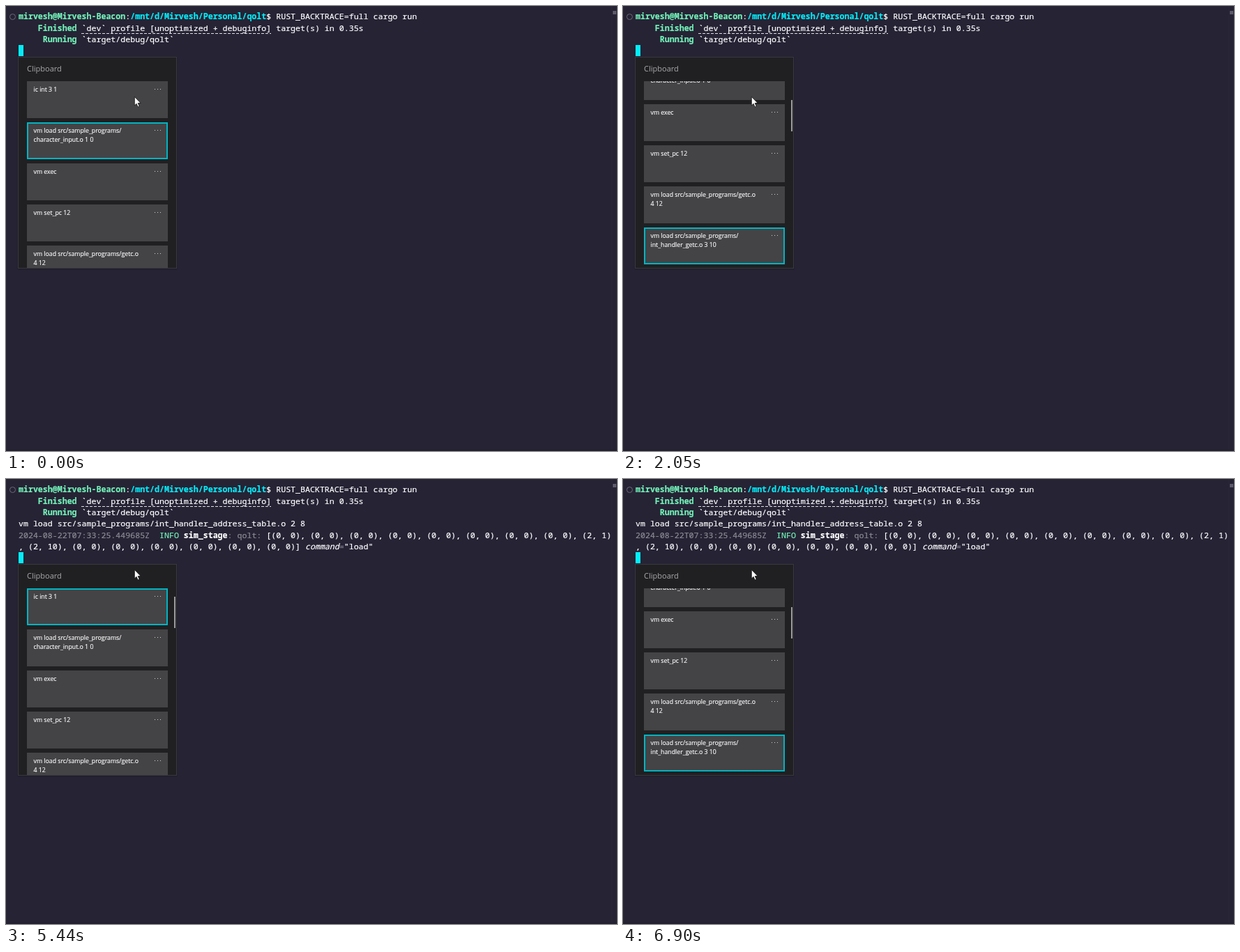
These frames come from a looping animation (876x639 px, 8000 ms). An HTML page:

```html
<!DOCTYPE html>
<html lang="en">
<head>
<meta charset="utf-8">
<title>Terminal with clipboard history</title>
<style>
  html, body { margin: 0; width: 100%; height: 100%; overflow: hidden; background: #262335; }
  body * { position: absolute; box-sizing: border-box; }
  pre { left: 18px; top: 7.2px; margin: 0; color: #fff; -webkit-text-stroke: .2px;
    font: 11.617px/16.33px "Noto Sans Mono", "DejaVu Sans Mono", monospace; }
  pre * { position: static; }
  b { font-weight: 700; }
  .green { color: #72f1b8; }
  .cyan { color: #03edf9; }
  .dim { color: #8c8a94; }
  #caret { left: 18px; width: 7px; height: 16px; background: #03edf9; }
  #dashes { left: 108px; top: 39px; width: 272px; height: 1px;
    background: repeating-linear-gradient(90deg, #dddce2 0 4px, transparent 4px 6px); }
  #ring { left: 5px; top: 11px; width: 9px; height: 9px; border: 1.5px solid #6b6878; border-radius: 50%; }
  #edge { left: 868px; top: 0; width: 8px; height: 639px; border-left: 1px solid #292639; }
  #thumb { left: 870px; top: 7px; width: 5px; height: 5px; background: #5d5a6a; }
  #foot { left: 0; top: 637px; width: 876px; height: 2px; background: #221f30; }
  #popup { left: 17px; width: 228px; height: 304px; background: #202023; border: 1px solid #39393e;
    box-shadow: 0 1px 2px #0004; font-family: "Open Sans", "Noto Sans", sans-serif; }
  #title { left: 12px; top: 8px; font-size: 11px; line-height: 16px; color: #a9a9ab; }
  #list { left: 12px; top: 34px; width: 202px; height: 268px; overflow: hidden; }
  .item { left: 0; width: 202px; height: 53px; padding: 6.4px 0 0 9.5px; background: #444447;
    color: #fff; font-size: 8.75px; line-height: 12.4px; white-space: pre; -webkit-text-stroke: .15px; }
  .item.on { box-shadow: inset 0 0 0 2px #00b4c1; }
  .item i { left: 183px; top: 11px; width: 1px; height: 1px; background: #d0d0d2;
    box-shadow: 4px 0 #d0d0d2, 8px 0 #d0d0d2; }
  #bar { left: 223px; width: 2px; height: 45px; background: #9b9b9d; }
  svg { left: 178px; top: 124px; }
</style>
</head>
<body>
<pre id="term"></pre>
<div id="dashes"></div>
<div id="caret"></div>
<div id="ring"></div>
<div id="edge"></div>
<div id="thumb"></div>
<div id="foot"></div>
<div id="popup">
  <div id="title">Clipboard</div>
  <div id="list"></div>
  <div id="bar"></div>
</div>
<svg width="20" height="26">
  <path id="arrow" d="M6.3 6.3V19l2.8-2.7 2 4.6 2.1-.9-2-4.5h3.9z" fill="#fff" stroke="#111" stroke-width=".8"/>
  <path id="beam" d="M5 2.5h5M7.5 3v9M5 12.5h5" fill="none" stroke="#dcdce0"/>
</svg>
<script>
const LOOP = 8000, PITCH = 59, VIEW = 210, LOADED = 3730;
const $ = id => document.getElementById(id);
const span = (cls, text) => `<span class="${cls}">${text}</span>`;
const bold = (cls, text) => `<b class="${cls}">${text}</b>`;
const zeros = n => Array(n).fill("(0, 0)").join(", ");

const prompt = bold("green", "mirvesh@Mirvesh-Beacon") + ":" + bold("cyan", "/mnt/d/Mirvesh/Personal/qolt") +
  "$ RUST_BACKTRACE=full cargo run\n" +
  bold("green", "    Finished") + " `dev` profile [unoptimized + debuginfo] target(s) in 0.35s\n" +
  bold("green", "     Running") + " `target/debug/qolt`\n";
const output = "vm load src/sample_programs/int_handler_address_table.o 2 8\n" +
  span("dim", "2024-08-22T07:33:25.449685Z") + "  " + span("green", "INFO") + " <b>sim_stage</b>" +
  span("dim", ": qolt:") + ` [${zeros(8)}, (2, 1)\n, (2, 10), ${zeros(6)}] <em>command</em>` +
  span("dim", "=") + '"load"';
$("term").innerHTML = `${prompt}<span id="output">${output}</span>`;

const load = "vm load src/sample_programs/";
const items = [
  "ic int 3 1",
  load + "\ncharacter_input.o 1 0",
  "vm exec",
  "vm set_pc 12",
  load + "getc.o\n4 12",
  load + "\nint_handler_getc.o 3 10",
  load + "\nint_handler_address_table.o 2 8"
].map(text => {
  const el = document.createElement("div");
  el.className = "item";
  el.textContent = text;
  el.append(document.createElement("i"));
  $("list").append(el);
  return el;
});

// [start time, selected item]; -1 means the popup is closed
const steps = [[0, 1], [940, 2], [1060, 3], [1370, 4], [2050, 5], [2980, 6], [LOADED, -1],
  [5440, 0], [6210, 1], [6360, 2], [6630, 3], [6750, 4], [6900, 5]];

const show = (id, on) => $(id).style.visibility = on ? "visible" : "hidden";

function draw(now) {
  const t = now % LOOP;
  const selected = steps.findLast(([start]) => start <= t)[1];
  const open = selected >= 0, loaded = t >= LOADED;
  const scroll = Math.max(0, selected * PITCH - VIEW);

  show("output", loaded);
  $("caret").style.top = (loaded ? 105 : 56) + "px";
  $("popup").style.display = open ? "block" : "none";
  $("popup").style.top = (loaded ? 122 : 73) + "px";
  show("arrow", open);
  show("beam", !open);
  items.forEach((el, i) => {
    el.style.top = i * PITCH - scroll + "px";
    el.classList.toggle("on", i === selected);
  });
  $("bar").style.top = 46 + scroll * 0.172 + "px";
  $("bar").style.display = t >= 1370 ? "block" : "none";
  requestAnimationFrame(draw);
}
requestAnimationFrame(draw);
</script>
</body>
</html>
```
